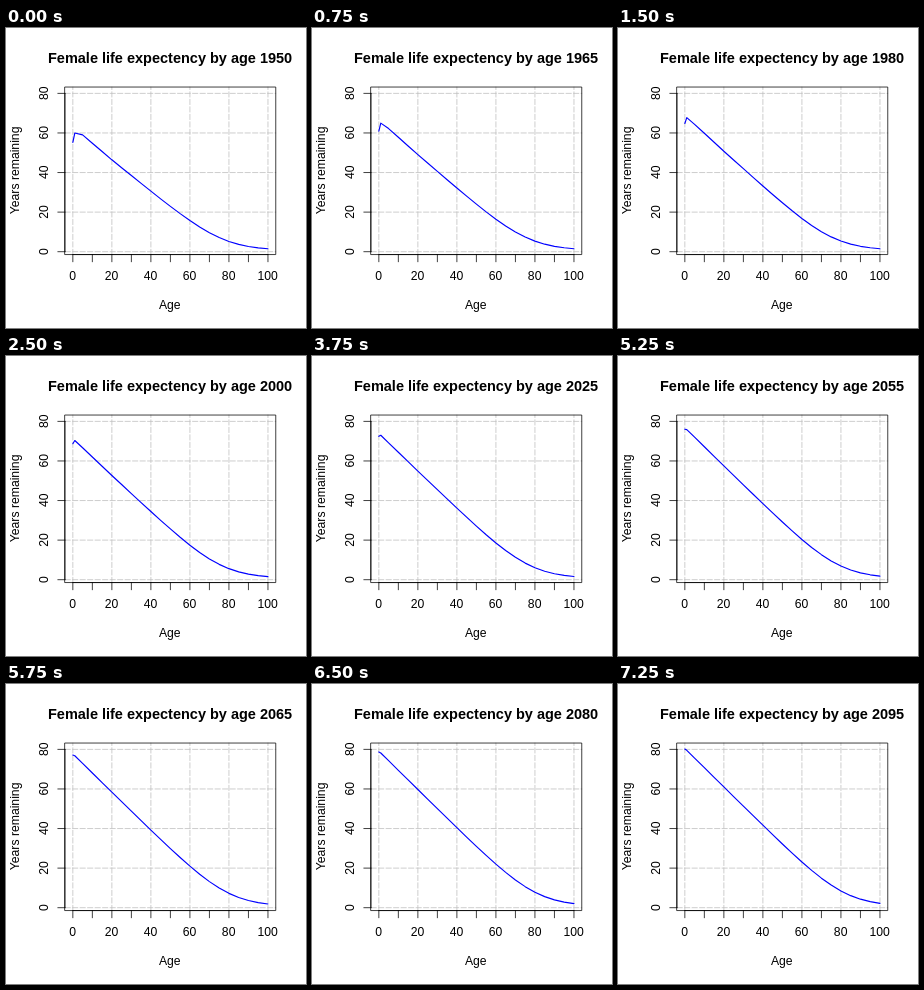
An HTML page that plays this animation: 300 by 300 pixels, repeating every 7.5 s.

```html
<!DOCTYPE html>
<html lang="en">
<head>
<meta charset="utf-8">
<title>Female life expectancy by age</title>
<style>
  html, body { margin: 0; width: 100%; height: 100%; overflow: hidden; background: #fff; }
  svg { display: block; width: 100vw; height: 100vh; }
  text { font: 12.2px "Liberation Sans", Arial, sans-serif; text-anchor: middle; }
  #title { font-size: 14.5px; font-weight: bold; }
  path { fill: none; stroke: #000; stroke-width: .75; stroke-linecap: round; stroke-linejoin: round; }
  #grid { stroke: #bebebe; stroke-dasharray: 5.25 2.25; }
  #curve { stroke: #00f; stroke-width: 1.15; }
</style>
</head>
<body>
<svg viewBox="0 0 300 300">
  <path id="grid"/>
  <path id="curve"/>
  <path id="box"/>
  <path id="axes"/>
  <g id="labels"></g>
  <text id="title" x="164.1" y="35"></text>
</svg>
<script>
const STEP = 250, STEPS = 30, FIRST_YEAR = 1950;
const LEFT = 59.04, RIGHT = 269.76, TOP = 59.04, BOTTOM = 226.56;

const byId = id => document.getElementById(id);
const setPath = (id, d) => byId(id).setAttribute("d", d);
const px = age => 66.84 + age * 1.9512;
const py = years => 223.7 - years * 1.979;

function label(text, x, y, angle = 0) {
  const node = document.createElementNS("http://www.w3.org/2000/svg", "text");
  node.textContent = text;
  node.setAttribute("transform", `translate(${x} ${y}) rotate(${angle})`);
  byId("labels").append(node);
}

function drawFrame() {
  let axes = `M${px(0)} ${BOTTOM}H${px(100)}M${LEFT} ${py(0)}V${py(80)}`, grid = "";
  for (let v = 0; v <= 100; v += 10) {
    axes += `M${px(v)} ${BOTTOM}v7.2`;
    if (v % 20) continue;
    grid += `M${px(v)} ${BOTTOM}V${TOP}`;
    label(v, px(v) - .3, 252);
    if (v > 80) continue;
    axes += `M${LEFT} ${py(v)}h-7.2`;
    grid += `M${LEFT} ${py(v)}H${RIGHT}`;
    label(v, 42, py(v) - .2, -90);
  }
  setPath("box", `M${LEFT} ${TOP}H${RIGHT}V${BOTTOM}H${LEFT}Z`);
  setPath("axes", axes);
  setPath("grid", grid);
  label("Age", 163.8, 281);
  label("Years remaining", 13, 142.4, -90);
}

// Straight decline that levels off in old age, lowered by child mortality that fades over the years
function yearsRemaining(age, year) {
  const t = year - FIRST_YEAR;
  const slow = Math.exp(-t / 45), fast = Math.exp(-t / 13);
  const slope = .98 - .18 * slow;
  const at20 = 48.3 + .0876 * t - 1.9 * fast;
  const bend = 20 + (at20 - .7) / slope;
  const adult = .7 + slope * 10 * Math.log(1 + Math.exp((bend - age) / 10));
  const childhood = .8 * slow * Math.max(0, 1 - age / 20);
  const infancy = age === 0 ? 8 * slow : age === 1 ? 2.4 * fast : 0;
  return adult + childhood - infancy;
}

function drawYear(year) {
  const ages = [0, 1];
  for (let age = 5; age <= 100; age += 5) ages.push(age);
  setPath("curve", "M" + ages.map(age => `${px(age)} ${py(yearsRemaining(age, year))}`).join("L"));
  byId("title").textContent = `Female life expectency by age ${year}`;
}

let shown;
function tick() {
  const year = FIRST_YEAR + 5 * (Math.floor(performance.now() / STEP) % STEPS);
  if (year !== shown) drawYear(shown = year);
  requestAnimationFrame(tick);
}

drawFrame();
tick();
</script>
</body>
</html>
```
